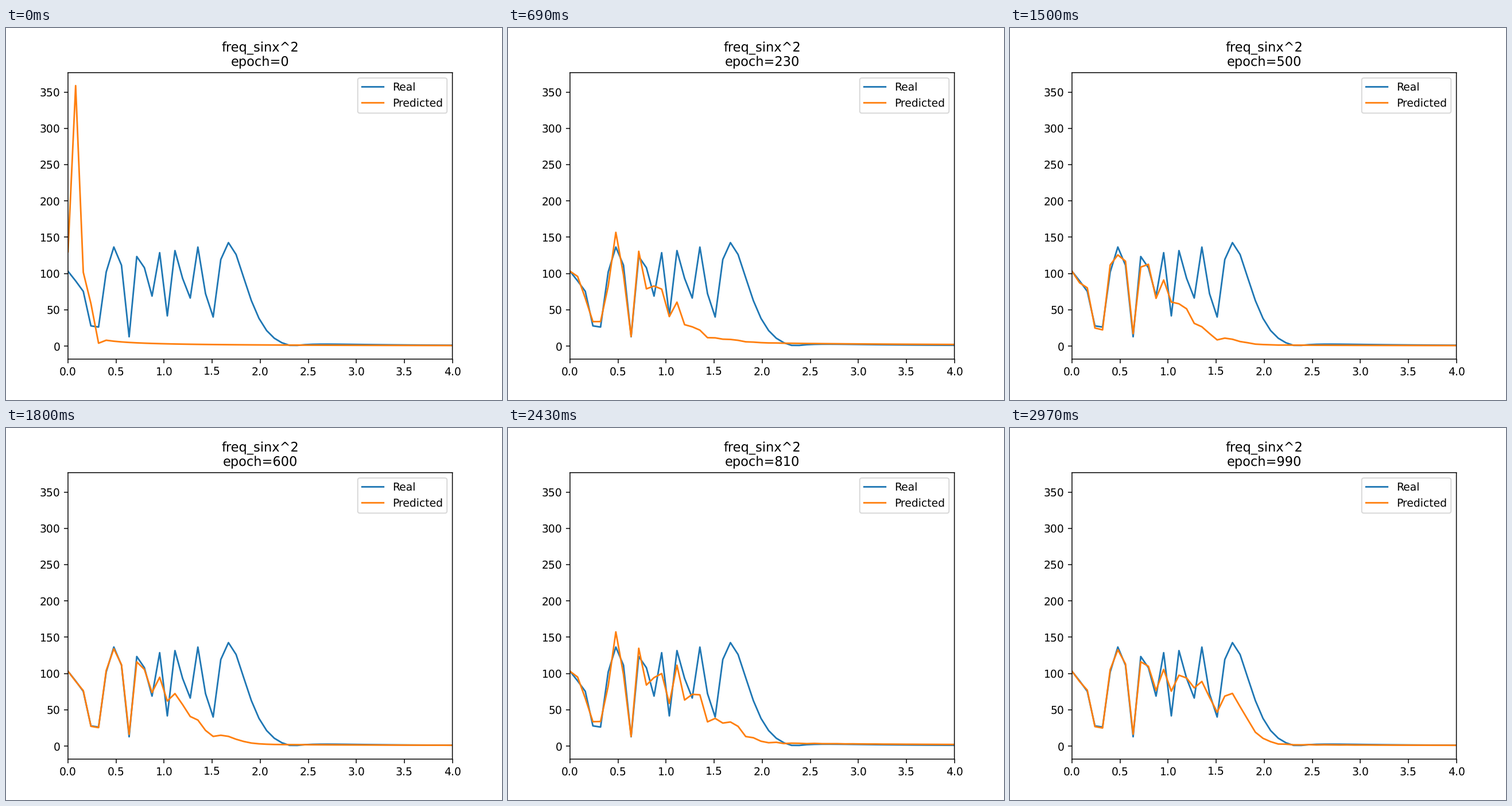
Recreate the animation shown at these times as a matplotlib script. Size 864 px wide and 648 px high, loop 3 s.

```python
import numpy as np
import matplotlib.pyplot as plt
from matplotlib.animation import FuncAnimation

plt.rcParams.update({"text.hinting": "none", "path.snap": False})

FRAMES, STEP = 100, 10
N, BINS = 1000, 56

x = np.linspace(-2 * np.pi, 2 * np.pi, N)
freq = np.fft.rfftfreq(N, x[1] - x[0])[:BINS]
real = np.abs(np.fft.rfft(np.sin(x ** 2)))[:BINS]
bins = np.arange(BINS)
inverse = 1 / np.maximum(freq, freq[1])


def lowpass(cutoff):
    return 1 / (1 + (freq / cutoff) ** 8)


# untrained output: a low-frequency spike with a 1/f tail
start = 3.2 * inverse
start[:5] = [130, 358.8, 101.7, 58.6, 4]

# the fit resolves low frequencies sharply and blurs the higher ones
sharp = lowpass(0.9)
blurred = np.convolve(real, [0.25, 0.5, 0.25], mode="same")
fitted = sharp * real + (1 - sharp) * blurred
ripple = 22 * np.minimum(bins / 4, 1) * np.cos(2 * np.pi * (bins - 3.5) / 2.6)


def predicted(epoch):
    cutoff = 0.05 + 1.05 * (1 - np.exp(-epoch / 60)) + 0.6 * (epoch / 990) ** 3
    gain = lowpass(cutoff)
    swing = 0.25 + 0.75 * np.cos(2 * np.pi * (epoch - 790) / 580)
    tail = 4 * (1.25 + swing) * inverse
    learned = np.abs(gain * (fitted + swing * ripple) + (1 - gain) * tail)
    untrained = np.exp(-epoch / 40)
    return untrained * start + (1 - untrained) * learned


fig, ax = plt.subplots(figsize=(6.4, 4.8), dpi=135)
ax.plot(freq, real, label="Real")
line, = ax.plot(freq, start, label="Predicted")
ax.set_xlim(0, 4)
ax.set_ylim(-17.9, 376.7)
ax.legend(loc="upper right")
title = ax.set_title("freq_sinx^2\nepoch=0")


def update(frame):
    epoch = frame * STEP
    line.set_ydata(predicted(epoch))
    title.set_text(f"freq_sinx^2\nepoch={epoch}")
    return line, title


anim = FuncAnimation(fig, update, frames=FRAMES, interval=30, repeat=True, repeat_delay=0)
plt.show()
```
